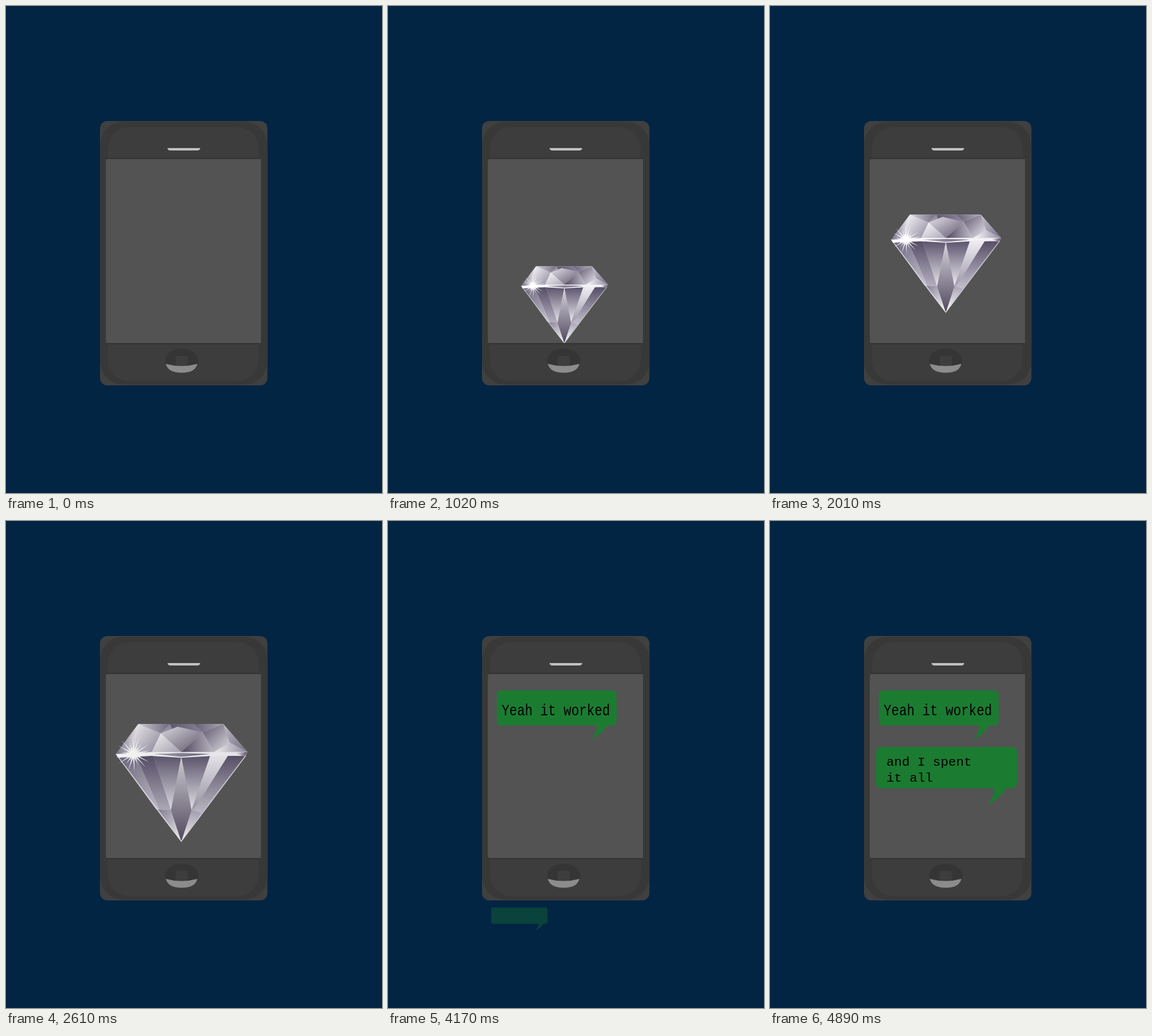
An HTML page that plays this animation: 612 by 792 pixels, repeating every 6.3 s.

```html
<!DOCTYPE html>
<html lang="en">
<head>
<meta charset="utf-8">
<title>Phone messages</title>
<style>
  html, body { margin: 0; width: 100%; height: 100%; overflow: hidden; background: #022543; }
  svg { display: block; width: 612px; height: 792px; }
  text { font: 21px "Liberation Mono", "Courier New", monospace; white-space: pre; }
</style>
</head>
<body>
<svg viewBox="0 0 612 792">
  <defs>
    <clipPath id="screen"><rect x="162" y="249" width="253" height="299"/></clipPath>
    <radialGradient id="glow">
      <stop offset=".2" stop-color="#fff"/>
      <stop offset="1" stop-color="#fff" stop-opacity="0"/>
    </radialGradient>
    <path id="bubble" fill="#1b7c31" d="M8 0H187Q195 0 195 8V49Q195 57 187 57H180Q170 72 154 80Q162 71 164 57H8Q0 57 0 49V8Q0 0 8 0Z"/>
  </defs>

  <rect width="612" height="792" fill="#022543"/>
  <rect x="153" y="187" width="272.5" height="430" rx="12" fill="#404040"/>
  <rect x="153" y="188" width="272.5" height="428" rx="38" fill="#383838"/>
  <rect x="166" y="197" width="245" height="413" rx="34" fill="#3d3d3d"/>
  <rect x="162" y="246.500" width="253" height="304" fill="#363636"/>
  <path d="M165 249H415V548H164Q162.500 548 162.500 545V252Q162.500 249 165 249Z" fill="#535353"/>
  <path d="M263 231H316Q316 235 311 235H268Q263 235 263 231Z" fill="#c0c0c0"/>
  <ellipse cx="286" cy="577" rx="27" ry="20" fill="#353535"/>
  <rect x="276" y="569" width="20" height="18" rx="3" fill="#3d3d3d"/>
  <path d="M260 582Q286 589 311.500 582Q308 596.500 286 596.500Q264 596.500 260 582Z" fill="#8c8c8c"/>

  <g clip-path="url(#screen)"><g id="diamond"></g></g>
  <use id="bubble1" href="#bubble"/>
  <use id="bubble2" href="#bubble"/>
  <text id="line1" transform="translate(185 316) scale(1 1.25)"></text>
  <text id="line2" x="189.500" y="398"></text>
  <text id="line3" x="189.500" y="424"></text>
</svg>
<script>
const LOOP = 6300, STEP = 30;
const $ = id => document.getElementById(id);
const clamp = v => Math.max(0, Math.min(1, v));
const mix = (a, b, k) => a + (b - a) * k;

function add(parent, name, attrs) {
  const node = document.createElementNS("http://www.w3.org/2000/svg", name);
  for (const key in attrs) node.setAttribute(key, attrs[key]);
  return parent.appendChild(node);
}

// Each facet: outline, gradient direction (x2, y2), start and end colour.
const facets = [
  ["0,32 24,0 115,0 141,30 70,125", 0, 1, "#d9d6df", "#aaa6b4"],
  ["0,32 24,0 19,32", 1, 0, "#76708a", "#f4f2f6"],
  ["24,0 48,10 38,31 19,32", 1, 1, "#f7f6f8", "#8c869b"],
  ["24,0 58,0 48,10", 1, 0, "#d5d1da", "#716a80"],
  ["58,0 83,0 93,9 48,10", 1, 0, "#554d66", "#8d869b"],
  ["48,10 58,0 70,30", 0, 1, "#8f899d", "#c9c5d0"],
  ["48,10 66,3 93,9 70,30", 1, 1, "#e4e1e8", "#5c546c"],
  ["48,10 70,30 38,31", 1, 1, "#fff", "#aaa4b5"],
  ["93,9 105,30 70,30", 1, 0, "#50485f", "#c4c0cc"],
  ["83,0 115,0 93,9", 1, 0, "#665e76", "#b2adbc"],
  ["93,9 115,0 122,20 105,30", 1, 1, "#5d556d", "#eceaf0"],
  ["115,0 141,30 122,20", 1, 1, "#c7c3cf", "#777087"],
  ["122,20 141,30 105,30", 1, 0, "#fff", "#8f899d"],
  ["2,35 22,34 59,92 43,91", 1, 1, "#6a637b", "#d5d2dc"],
  ["22,34 40,34 59,92 47,92", 0, 1, "#554d66", "#b5b0be"],
  ["40,34 70,35 59,92", 0, 1, "#5c546d", "#e9e7ed"],
  ["70,35 101,34 81,92", 0, 1, "#5c546d", "#f0eef3"],
  ["101,34 120,34 88,85 81,92", 0, 1, "#efedf2", "#9d97a9"],
  ["120,34 139,33 91,95 84,91", 0, 1, "#554d66", "#c5c1cd"],
  ["43,91 59,92 70,125", 1, 1, "#817a91", "#fff"],
  ["81,92 91,95 70,125", 0, 1, "#aaa4b5", "#fff"],
  ["70,35 81,92 70,125 59,92", 0, 1, "#d8d5dd", "#51495f"],
  ["0,32 38,30 70,30 105,30 141,30 139,34 104,34 70,36 38,34 2,36", 1, 0, "#fff", "#f1eff4"],
  ["40,32 70,31 101,32 70,35", 1, 0, "#aaa4b5", "#69617a"],
  ["128,31 141,30 138,35 133,33", 1, 0, "#fff", "#51495f"]
];

function buildDiamond(group) {
  facets.forEach(([points, x2, y2, from, to], i) => {
    const gradient = add(group, "linearGradient", { id: "shade" + i, x2, y2 });
    add(gradient, "stop", { "stop-color": from });
    add(gradient, "stop", { offset: 1, "stop-color": to });
    add(group, "polygon", { points, fill: `url(#shade${i})` });
  });
  add(group, "path", { d: "M0 32L70 125L139 34", fill: "none", stroke: "#eeecf1", "stroke-width": .8 });
  const star = add(group, "g", { transform: "translate(19 32)", fill: "#fff" });
  add(star, "circle", { r: 8, fill: "url(#glow)" });
  for (let i = 0; i < 18; i++) {
    const length = 13 + 7 * Math.abs(Math.sin(i * 2.1));
    add(star, "path", { d: `M0 -.9L${length} 0L0 .9Z`, transform: `rotate(${i * 20 + 8})` });
  }
}

function drawDiamond(t) {
  const grow = clamp((t - 1530) / 930);
  const rise = Math.max(0, 1530 - t) / STEP * 4.37;
  const x = mix(217, 179, grow), y = mix(349, 330, grow) + rise;
  $("diamond").setAttribute("transform",
    `translate(${x} ${y}) scale(${mix(1, 1.518, grow)} ${mix(1, 1.528, grow)})`);
  $("diamond").setAttribute("opacity", 1 - clamp((t - 2580) / 390));
}

function drawBubble(id, t, start, from, to) {
  const k = clamp((t - start) / 369);
  const [x, y, scale] = from.map((v, i) => mix(v, to[i], k));
  $(id).setAttribute("transform", `translate(${x} ${y}) scale(${scale})`);
  $(id).setAttribute("opacity", t < start ? 0 : clamp(.34 + (t - start) / STEP * .115));
}

const typed = (text, t, start, end) =>
  text.slice(0, Math.floor(clamp((t - start) / (end - start)) * text.length));

function render(t) {
  drawDiamond(t);
  drawBubble("bubble1", t, 3240, [184.4, 534, .296], [177, 275.5, 1]);
  drawBubble("bubble2", t, 4170, [168, 628.5, .47], [172.5, 367.5, 1.178]);
  $("line1").textContent = typed("Yeah it worked", t, 3600, 3840);
  const [second, third = ""] = typed("and I spent\nit all", t, 4500, 4890).split("\n");
  $("line2").textContent = second;
  $("line3").textContent = third;
}

buildDiamond($("diamond"));
const began = performance.now();
function tick() {
  const t = (performance.now() - began) % LOOP;
  render(Math.floor(t / STEP) * STEP);
  requestAnimationFrame(tick);
}
tick();
</script>
</body>
</html>
```
